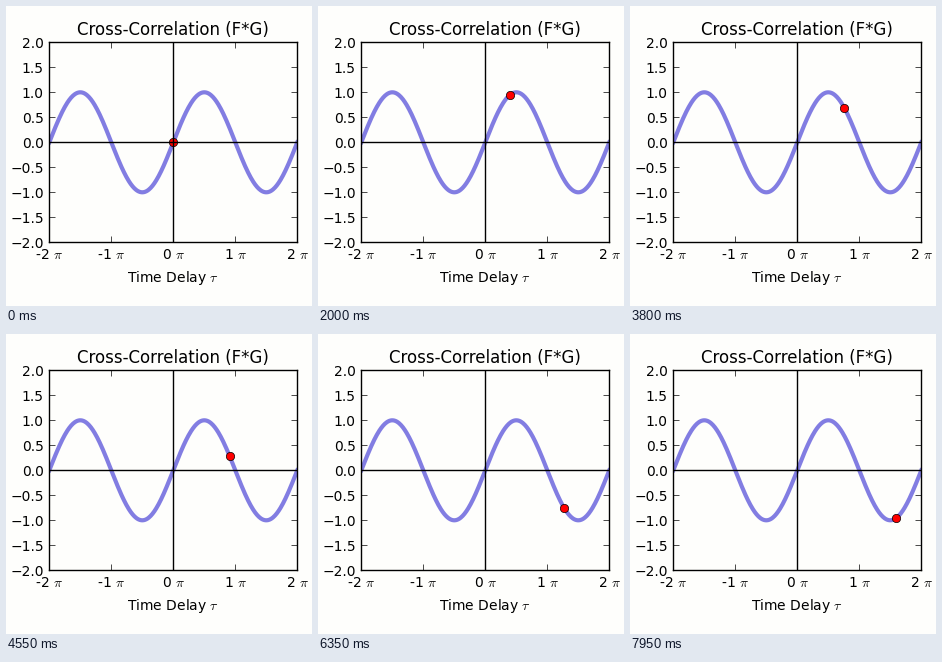
These frames come from a looping animation (306 px wide and 300 px high, 8 s). A matplotlib script:

```python
import numpy as np
import matplotlib.pyplot as plt
from matplotlib.animation import FuncAnimation

W, H, DPI = 306, 300, 100
FRAMES, INTERVAL = 160, 50
STEP = 0.01  # delay per frame, in units of pi
PAPER = "#fefefc"

plt.rcParams.update({
    "font.family": "DejaVu Sans",
    "font.size": 10,
    "mathtext.fontset": "cm",
    "axes.linewidth": 1.0,
    "xtick.direction": "in",
    "ytick.direction": "in",
    "xtick.top": True,
    "ytick.right": True,
    "xtick.major.size": 4,
    "ytick.major.size": 4,
    "xtick.major.width": 0.5,
    "ytick.major.width": 0.5,
    "xtick.major.pad": 4,
    "ytick.major.pad": 4,
    "savefig.dpi": "figure",
})

fig = plt.figure(figsize=(W / DPI, H / DPI), dpi=DPI, facecolor=PAPER)
left, top, width, height = 43.3, 36.3, 248, 200
ax = fig.add_axes([left / W, 1 - (top + height) / H, width / W, height / H],
                  facecolor=PAPER)
ax.set_xlim(-2, 2)
ax.set_ylim(-2, 2)
ax.set_xticks(range(-2, 3), [rf"{k} $\pi$" for k in range(-2, 3)])
ax.set_yticks(np.arange(-2, 2.1, 0.5))
ax.set_title("Cross-Correlation (F*G)", fontsize=12, pad=5)
ax.set_xlabel(r"Time Delay $\tau$", labelpad=5)

tau = np.linspace(-2, 2, 400)
ax.plot(tau, np.sin(np.pi * tau), color="#827de2", lw=3, zorder=2)
dot, = ax.plot([], [], "o", color="red", ms=6, mec="black", mew=0.5, zorder=3)
ax.axhline(0, color="black", lw=1, zorder=4)
ax.axvline(0, color="black", lw=1, zorder=4)


def draw(i):
    t = i * STEP
    dot.set_data([t], [np.sin(np.pi * t)])
    return dot,


anim = FuncAnimation(fig, draw, frames=FRAMES, interval=INTERVAL,
                     init_func=lambda: draw(0), repeat=True, repeat_delay=0)
plt.show()
```
